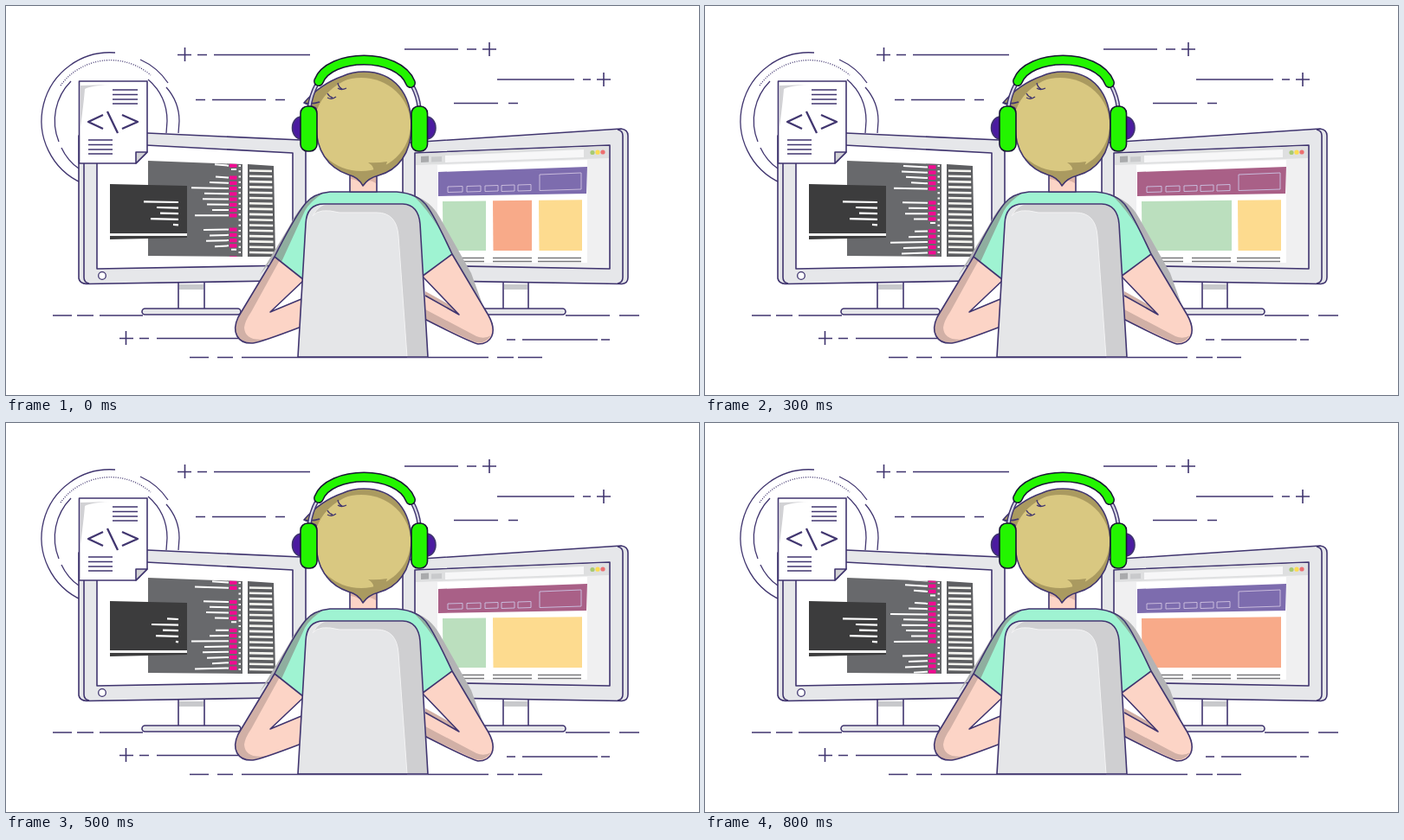
Recreate the animation shown at these times as an HTML page. Size 800 by 450 pixels, loop 0.9 s.

```html
<!DOCTYPE html>
<html lang="en">
<head>
<meta charset="utf-8">
<title>Developer at work</title>
<style>
  html, body { margin: 0; width: 100%; height: 100%; overflow: hidden; background: #fff; }
  svg { display: block; width: 100vw; height: 100vh; }
  .ink { stroke: #40356f; stroke-width: 1.6; stroke-linejoin: round; }
  .thin { stroke-width: 1.3; }
  .bold { stroke-width: 2.3; }
  .line { fill: none; }
  .body { fill: #e6e7ea; }
  .paper { fill: #fff; }
  .skin { fill: #fcd4c6; }
</style>
</head>
<body>
<svg viewBox="0 0 800 450">
  <defs>
    <clipPath id="codeClip"><path d="M164 179L273 183V290L164 289Z"/></clipPath>
    <clipPath id="headClip"><path d="M344 112Q363 90 389 81Q400 76 413 76C448 76 468 101 468 139C468 171 452 190 430 196Q418 199 412 208Q407 198 395 195C371 187 358 166 358 139V118Z"/></clipPath>
  </defs>

  <!-- background dashes and badge rings -->
  <path class="ink line" d="M221 56.500H232M240 56.500H351M198 56.500H214M206.500 48V64
    M460 50H522M532 50H543M550 50H566M558 42V58
    M567 85H656M666 85H675M682 85H698M690 77V93
    M219 108.500H230M238 108.500H300M311 108.500H322M517 112.500H568M580 112.500H591
    M54 358H76M82 358H101M108 358H158M646 358H697M708 358H731
    M131 384.500H147M138.500 376V392M154 384.500H165M174 384.500H268M578 386H588M596 386H683M687 386H697
    M212 406.500H234M244 406.500H262M272 406.500H557M567 406.500H586M591 406.500H619"/>
  <g class="ink thin line">
    <path d="M126 54A79 79 0 0 0 88 205M155 62Q175 71 187 89M185 94Q200 111 200 133L199 147"/>
    <path d="M75 87A65 65 0 0 0 61 157M64 164Q71 179 84 188M164 85Q186 104 186 133L185 147"/>
    <path d="M63 92A71 71 0 0 1 167 80" stroke-dasharray="1 1.6"/>
  </g>

  <!-- left monitor -->
  <g class="ink body">
    <path class="paper" d="M199 319H229V351H199Z"/>
    <rect x="157" y="350" width="114" height="7" rx="3.5"/>
    <path d="M84 150V315Q85 321 93 321.500L310 318L346 290V161Q346 155 340 155L163 147L90 145Z"/>
    <path class="line" d="M90 170V314Q90 320 96 321"/>
    <path class="paper" d="M105 158L331 170V300L105 304Z"/>
    <circle class="paper thin" cx="111" cy="312" r="4.3"/>
  </g>
  <path fill="#c8c9cc" d="M200 322H228V328H200Z"/>
  <path fill="#68696c" d="M164 179L273 183V290L164 289Z"/>
  <path fill="#5d5e61" d="M279 183L309 185L311 290H279Z"/>
  <path id="stripes" stroke="#f4f4ef" stroke-width="2.6"/>
  <g clip-path="url(#codeClip)">
    <path id="pink" stroke="#f00b91" stroke-width="4.2"/>
    <path id="code" stroke="#fff" stroke-width="2"/>
  </g>
  <path fill="#3c3c3d" d="M120 206L209 208V268L120 270Z"/>
  <path fill="#f4f4f4" d="M120 263L209 263V266L120 266Z"/>
  <path id="terminal" stroke="#fff" stroke-width="2.2"/>

  <!-- right monitor -->
  <g class="ink body">
    <path class="paper" d="M574 319H603V351H574Z"/>
    <rect x="540" y="350" width="106" height="7" rx="3.5"/>
    <path d="M458 164Q458 159 465 158L710 142Q718 143 718 150V314Q718 321 711 321.500L498 318L458 290Z"/>
    <path class="line" d="M706 143Q712 144 712 150V314Q712 320 706 321"/>
    <path style="fill:#f0f0f1" d="M472 170L697 161V304L472 300Z"/>
  </g>
  <path fill="#c8c9cc" d="M575 322H602V328H575Z"/>
  <path fill="#dedfe0" d="M473 171L696 162V176L473 184Z"/>
  <path fill="#fff" d="M498 184L671 178V297H498Z"/>
  <path fill="#f7f7f8" d="M507 173L667 166V175L507 181Z"/>
  <path fill="#a9aaac" d="M479 174L488 173.500V180.500L479 181Z"/>
  <path fill="#c9cacc" d="M491 174.500L503 174V180L491 180.500Z"/>
  <circle cx="677" cy="169.500" r="2.6" fill="#a8ca73"/>
  <circle cx="683" cy="169.200" r="2.6" fill="#fbdc50"/>
  <circle cx="689" cy="169" r="2.6" fill="#ed6f70"/>
  <path id="banner" d="M499 192L671 186L670 217L499 220Z"/>
  <path fill="none" stroke="#c9bbdc" d="M510 209L527 208.500V215L510 215.500ZM532 208.500L548 208V214.500L532 215ZM553 208L568 207.500V214L553 214.500ZM572 207.500L587 207V214L572 214.500ZM591 207L606 206.500V213.500L591 214ZM616 195L664 193V212L616 213.500Z"/>
  <g id="cards"></g>
  <path stroke="#77777a" stroke-width="1.6" d="M503 291.500H552M562 291.500H607M614 291.500H664M503 295.500H552M562 295.500H607M614 295.500H664"/>

  <!-- document badge -->
  <path class="ink paper" d="M84.500 87H163V169L150 182H84.500Z"/>
  <path fill="#d2d2d5" d="M86 92L120 91Q98 92 91 96Q90 110 86 140Z"/>
  <path class="ink" fill="#d2d2d5" d="M163 169H150V182Z"/>
  <path class="ink line" d="M123 97H152M123 102.500H152M123 108H152M123 113H152M95 155H123M95 160.500H123M95 166H123M95 171H123"/>
  <path class="ink bold line" d="M112 126L95 134L112 142M117 122L129 147M134 126L152 134L134 142"/>

  <!-- arms and shirt -->
  <path fill="#b3b3b5" d="M352 222Q337 234 327 255L293 311L310 290ZM470 219Q490 225 501 245L537 309L550 345L514 287Z"/>
  <path class="skin" d="M310 290L268 360C260 377 267 391 285 390Q294 389 341 371V339L305 354L344 317Z"/>
  <path fill="#d1b0a6" d="M310 290L268 360C260 377 267 391 285 390Q296 388 302 385Q276 389 275 372Q276 364 283 354L316 294Z"/>
  <path class="ink line" d="M310 290L268 360C260 377 267 391 285 390Q294 389 341 371M344 317L305 354L341 339"/>
  <path class="skin" d="M515 287L557 358C568 378 560 391 545 391Q536 389 483 362L484 335L523 357L480 312Z"/>
  <path fill="#d1b0a6" d="M484 335L523 357L511 345L484 330ZM484 362L539 388Q552 393 560 381Q552 386 543 382L484 351Z"/>
  <path class="ink line" d="M515 287L557 358C568 378 560 391 545 391Q536 389 483 362M480 312L523 357L484 335"/>
  <path fill="#9ff3d2" d="M310 290Q333 244 346 228Q355 217 374 215H451Q477 217 487 233Q496 246 515 287L480 313L344 317Z"/>
  <path fill="#8fae9f" d="M310 290Q333 244 346 228Q354 218 367 216Q351 226 345 237L318 296ZM470 219Q482 224 489 238L505 267Q491 240 470 219Z"/>
  <path class="ink line" d="M344 317L310 290Q333 244 346 228Q355 217 374 215H451Q477 217 487 233Q496 246 515 287L480 313"/>
  <path class="ink skin" d="M397 190V215H428V190Z"/>
  <path fill="#dcb1a4" d="M398 193H427V205Q416 198 412 208Q407 201 398 200Z"/>

  <!-- chair -->
  <path fill="#e5e6e8" d="M337 406L346 252Q347 229 367 229H458Q476 230 478 252L487 406Z"/>
  <path fill="#cfcfd1" stroke="#f3f3f4" d="M385 239Q361 233 354 243Q361 229 372 229H458Q476 230 478 252L487 406H463L453 266Q451 239 428 239Z"/>
  <path class="ink line" d="M337 406L346 252Q347 229 367 229H458Q476 230 478 252L487 406Z"/>

  <!-- head and headphones -->
  <ellipse class="ink" cx="341" cy="141" rx="10.500" ry="13" fill="#4b1ba0"/>
  <ellipse class="ink" cx="485.500" cy="141" rx="10.500" ry="13" fill="#4b1ba0"/>
  <g clip-path="url(#headClip)">
    <path fill="#aa9a60" d="M340 70H475V215H340Z"/>
    <ellipse cx="410" cy="137" rx="57" ry="54" fill="#d9c881"/>
    <path fill="#aa9a60" d="M344 112L389 81L396 84Q368 96 359 120ZM418 181Q427 182 440 180L436 192H424Q426 186 418 181Z"/>
  </g>
  <path class="ink line" d="M358 118L344 112Q363 90 389 81Q400 76 413 76C448 76 468 101 468 139C468 171 452 190 430 196Q418 199 412 208Q407 198 395 195C371 187 358 166 358 139V118M344 112Q353 114 362 111"/>
  <path class="ink thin line" d="M371 106Q376 109 381 105M371 101Q373 105 377 106M383 95Q387 98 393 95M383 89Q384 94 388 96"/>
  <g fill="none">
    <path stroke="#40356f" stroke-width="5" d="M359 90Q352 103 350 118M469 92Q476 105 477 118"/>
    <path stroke="#d7d5e5" stroke-width="2.2" d="M359 90Q352 103 350 118M469 92Q476 105 477 118"/>
    <g stroke-linecap="round">
      <path stroke="#171533" stroke-width="12" d="M361 87C373 55 453 53 467 89"/>
      <path stroke="#23f500" stroke-width="9" d="M361 87C373 55 453 53 467 89"/>
    </g>
  </g>
  <g fill="#23f500" stroke="#171533" stroke-width="1.6">
    <rect x="340" y="116" width="19" height="52" rx="8"/>
    <rect x="468" y="116" width="18.500" height="52" rx="8"/>
  </g>
</svg>
<script>
const STEP = 100, STEPS = 9, PERIOD = 92.7, SPACING = 6.25;
const blocks = [
  { top: 198.6, starts: [242, 235, 214, 229, 227, 232, 238, 218] },
  { top: 258.6, starts: [228, 235, 231, 241] }
];
const terminals = [
  [159, 174, 178, 167, 193],
  [159, 186, 178, 192, 193],
  [186, 168, 181, 173, 196]
];
const terminalAt = [0, 1, 1, 0, 0, 2, 2, 2, 0];
const PURPLE = '#7d6cae', MAGENTA = '#a96087';
const GREEN = '#bbdfbe', ORANGE = '#f8aa89', YELLOW = '#fddb8f';
// Each page layout lasts until the given step.
const pages = [
  { until: 3, banner: PURPLE, cards: [[504, 554, GREEN], [562, 607, ORANGE], [615, 665, YELLOW]] },
  { until: 5, banner: MAGENTA, cards: [[504, 608, GREEN], [615, 665, YELLOW]] },
  { until: 7, banner: MAGENTA, cards: [[504, 554, GREEN], [562, 665, YELLOW]] },
  { until: 9, banner: PURPLE, cards: [[504, 665, ORANGE]] }
];

const byId = id => document.getElementById(id);
const setPath = (id, d) => byId(id).setAttribute('d', d);
const bar = (x1, x2, y, tilt = 0) => `M${x1} ${y - tilt}L${x2} ${y}`;
const rows = (count, draw) => Array.from({ length: count }, (_, i) => draw(i)).join('');

setPath('stripes', rows(16, i => bar(281, 307 + i * 0.12, 191 + i * 6.3, 0.5)));

function drawCode(step) {
  let code = rows(17, i => bar(268.5, 271, 185 + i * SPACING)), pink = '';
  for (const shift of [-PERIOD, 0, PERIOD]) {
    const offset = shift - step * PERIOD / STEPS;
    for (const { top, starts } of blocks) {
      starts.forEach((x, i) => {
        const y = top + offset + i * SPACING;
        code += bar(x, 257, y, (242 - y) * 0.025);
        pink += bar(258, 266.5, y);
      });
    }
    code += bar(260, 266, 281.8 + offset);
  }
  setPath('code', code);
  setPath('pink', pink);
}

function drawPage(step) {
  const page = pages.find(p => step < p.until);
  byId('banner').setAttribute('fill', page.banner);
  const topAt = x => 226 - (x - 504) * 0.011;
  byId('cards').innerHTML = page.cards.map(([left, right, fill]) =>
    `<path fill="${fill}" d="M${left} ${topAt(left)}L${right} ${topAt(right)}V283H${left + 0.5}Z"/>`).join('');
}

let shown = -1;
function tick() {
  const step = Math.floor(performance.now() / STEP) % STEPS;
  if (step !== shown) {
    shown = step;
    drawCode(step);
    drawPage(step);
    setPath('terminal', terminals[terminalAt[step]].map((x, i) => bar(x, 199, 227 + i * 6.6, 0.6)).join(''));
  }
  requestAnimationFrame(tick);
}
tick();
</script>
</body>
</html>
```
